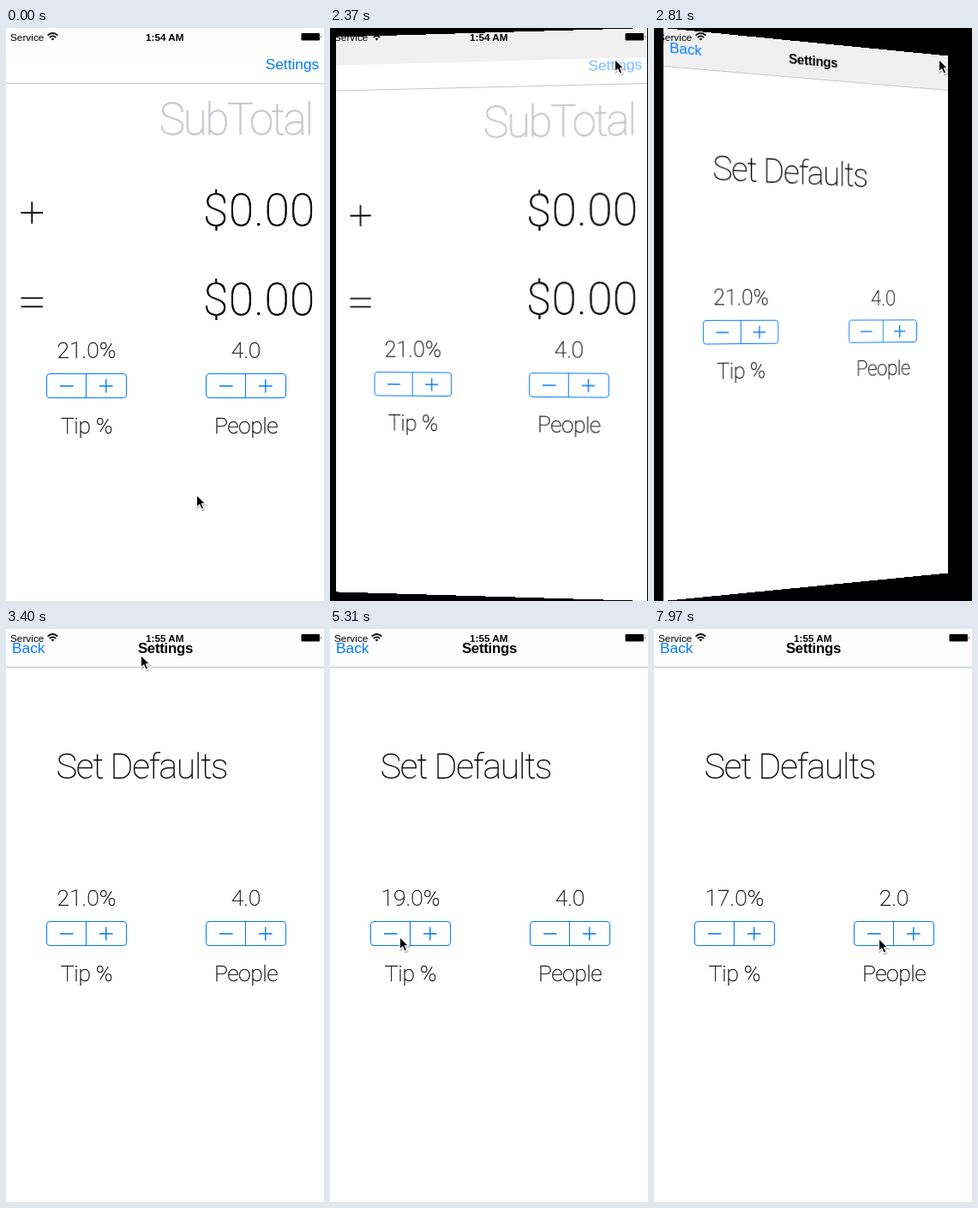
Write an HTML page that moves like this. It is 371 px wide and 667 px high and loops after 8000 ms.

```html
<!DOCTYPE html>
<html lang="en">
<head>
<meta charset="utf-8">
<title>Tip calculator</title>
<style>
html, body { margin: 0; width: 100%; height: 100%; overflow: hidden; background: #000; }
svg { position: absolute; left: 0; top: 0; width: 371px; height: 667px; display: block; color: #000; }
text { font-family: "Liberation Sans", Arial, sans-serif; white-space: pre; }
.thin, .lite { font-family: Roboto, "Helvetica Neue", sans-serif; fill: currentColor; stroke: currentColor; }
.thin { font-weight: 100; stroke-width: .75; }
.lite { font-weight: 200; stroke-width: .3; }
.blue { fill: #007aff; }
.mid { text-anchor: middle; }
.end { text-anchor: end; }
.line { fill: none; stroke: #007aff; }
</style>
</head>
<body>
<svg id="main" viewBox="0 0 371 667"></svg>
<svg id="prefs" viewBox="0 0 371 667"></svg>
<svg id="top" viewBox="0 0 371 667">
  <text x="5" y="14.5" font-size="11.8">Service</text>
  <path d="M48.6 8.6Q54.5 3.4 60.4 8.6M50.8 11Q54.5 7.7 58.2 11" fill="none" stroke="#000" stroke-width="1.7"/>
  <path d="M52.6 12.6Q54.5 11 56.4 12.6L54.5 14.6Z"/>
  <text id="clock" class="mid" x="185.2" y="14.5" font-size="11.7" font-weight="bold"></text>
  <rect x="344.5" y="6" width="21.5" height="8.5" rx="1.2"/>
  <path d="M367 8.6Q368.6 10.3 367 12Z"/>
  <g id="cursor">
    <g transform="translate(-.6 -.4)">
      <path d="M0 0V14.2L3.3 11.2L5.7 16.6L8.4 15.4L6 10.2H10.4Z" opacity=".22" transform="translate(.8 1.6)" stroke="#000" stroke-width="1.6"/>
      <path d="M0 0V14.2L3.3 11.2L5.7 16.6L8.4 15.4L6 10.2H10.4Z" stroke="#fff" stroke-width="1.1" stroke-linejoin="round"/>
    </g>
  </g>
</svg>
<script>
const LOOP = 8000, TICK = 147.6;
const FLIP_START = 2272, FLIP_TIME = 694, DEPTH = 1182, HALF = 185.5;
const $ = id => document.getElementById(id);

const label = (s, cls, x, y, size, gap = 0, extra = '') =>
  `<text class="${cls}" x="${x}" y="${y}" font-size="${size}" letter-spacing="${gap}" ${extra}>${s}</text>`;

// A value, its stepper and its caption, centred on x.
const stepper = (id, x, y, value, caption, gap) => `
  ${label(value, 'lite mid', x, y, 26.5, 0, `id="${id}Value"`)}
  <rect id="${id}Press" class="blue" x="${x - 46.5}" y="${y + 18.5}" width="46" height="28" rx="3.5" opacity="0"/>
  <g class="line">
    <rect x="${x - 46.5}" y="${y + 18.5}" width="93" height="28" rx="3.5"/>
    <path d="M${x - .5} ${y + 18.5}v28"/>
    <path stroke-width="1.4" d="M${x - 31} ${y + 32.7}h15.5M${x + 15} ${y + 32.7}h15.5m-7.75 -7.75v15.5"/>
  </g>
  ${label(caption, 'lite mid', x, y + 88, 26.5, gap)}`;

const page = (id, navHeight, shade, body) => `
  <rect width="371" height="667" fill="#fff"/>
  <rect id="${id}Nav" width="371" height="${shade}" fill="#f0f0f0"/>
  <path d="M0 ${navHeight + .5}H371" stroke="#c4c4c4"/>${body}`;

$('main').innerHTML = page('main', 64, 34,
  label('Settings', 'blue end', 365.2, 48, 17.3, 0, 'id="link"') +
  label('SubTotal', 'thin end', 356.8, 124, 51, -2.2, 'color="#c7c7cd"') +
  label('$0.00', 'thin end', 361, 229.5, 52.5, .9) +
  label('$0.00', 'thin end', 361, 333.5, 52.5, .9) +
  '<path d="M17.5 215H43M30.3 202.3V227.8M17.5 314.3H43M17.5 324.3H43" stroke="#000" stroke-width="1.8"/>' +
  stepper('mainTip', 94, 384, '21.0%', 'Tip %', -.3) +
  stepper('mainPeople', 280, 384, '4.0', 'People', -.5));

$('prefs').innerHTML = page('prefs', 44, 44,
  label('Back', 'blue', 7, 28, 17.3) +
  label('Settings', 'mid', 186, 28, 16.8, -.25, 'font-weight="bold"') +
  label('Set Defaults', 'lite mid', 158.5, 174, 41, -1.2) +
  stepper('tip', 94, 322, '21.0%', 'Tip %', -.3) +
  stepper('people', 280, 322, '4.0', 'People', -.5));

// Pointer path: tick, x, y
const path = [
  [0, 223, 544], [2, 223, 571], [3, 223, 566], [5, 228, 488], [8, 246, 345],
  [9, 260, 262], [10, 283, 130], [11, 311, 2], [12, 329, 22], [13, 333, 37],
  [20, 333, 37], [21, 305, 42], [22, 250, 40], [23, 158, 31], [25, 122, 130],
  [28, 94, 310], [30, 86, 358], [33, 84, 359], [36, 82, 359], [41, 82, 359],
  [42, 118, 361], [43, 190, 361], [44, 243, 361], [45, 286, 361],
  [46, 276, 361], [47, 267, 361], [48, 263, 361]
];
const tipTaps = [31, 34, 37, 40], peopleTaps = [50, 53];

function pointer(n) {
  const i = path.findIndex(p => p[0] >= n);
  if (i < 0) return path[path.length - 1].slice(1);
  if (!i) return path[0].slice(1);
  const a = path[i - 1], b = path[i], k = (n - a[0]) / (b[0] - a[0]);
  return [1, 2].map(j => a[j] + (b[j] - a[j]) * k);
}

// Ease-in-out curve (.42, 0, .58, 1), solved by bisection.
function ease(x) {
  if (x <= 0 || x >= 1) return x <= 0 ? 0 : 1;
  let lo = 0, hi = 1, s;
  for (let i = 0; i < 24; i++) {
    s = (lo + hi) / 2;
    const u = 1 - s, v = 3 * u * u * s * .42 + 3 * u * s * s * .58 + s * s * s;
    if (v < x) lo = s; else hi = s;
  }
  return s * s * (3 - 2 * s);
}

function turn(el, angle, visible) {
  el.style.visibility = visible ? 'visible' : 'hidden';
  const back = HALF * Math.abs(Math.sin(angle));
  el.style.transform = angle
    ? `perspective(${DEPTH}px) translateZ(${-back}px) rotateY(${angle}rad)` : 'none';
}

function setStepper(id, n, start, taps, unit) {
  const count = taps.filter(t => n > t).length;
  $(id + 'Value').textContent = (start - count).toFixed(1) + unit;
  $(id + 'Press').setAttribute('opacity', taps.includes(n) ? .15 : 0);
}

function draw(ms) {
  const n = Math.floor(ms / TICK + .07), t = n * TICK;
  const p = ease((t - FLIP_START) / FLIP_TIME);
  turn($('main'), -p * Math.PI, p < .5);
  turn($('prefs'), (1 - p) * Math.PI, p >= .5);
  const shade = p > 0 && p < 1 ? 1 : .15;
  $('mainNav').setAttribute('opacity', shade);
  $('prefsNav').setAttribute('opacity', shade);
  $('link').setAttribute('opacity', n >= 15 ? .55 : 1);
  $('clock').textContent = t < 3000 ? '1:54 AM' : '1:55 AM';
  setStepper('tip', n, 21, tipTaps, '%');
  setStepper('people', n, 4, peopleTaps, '');
  $('cursor').setAttribute('transform', `translate(${pointer(n)})`);
}

function loop() {
  draw(performance.now() % LOOP);
  requestAnimationFrame(loop);
}
loop();
</script>
</body>
</html>
```
